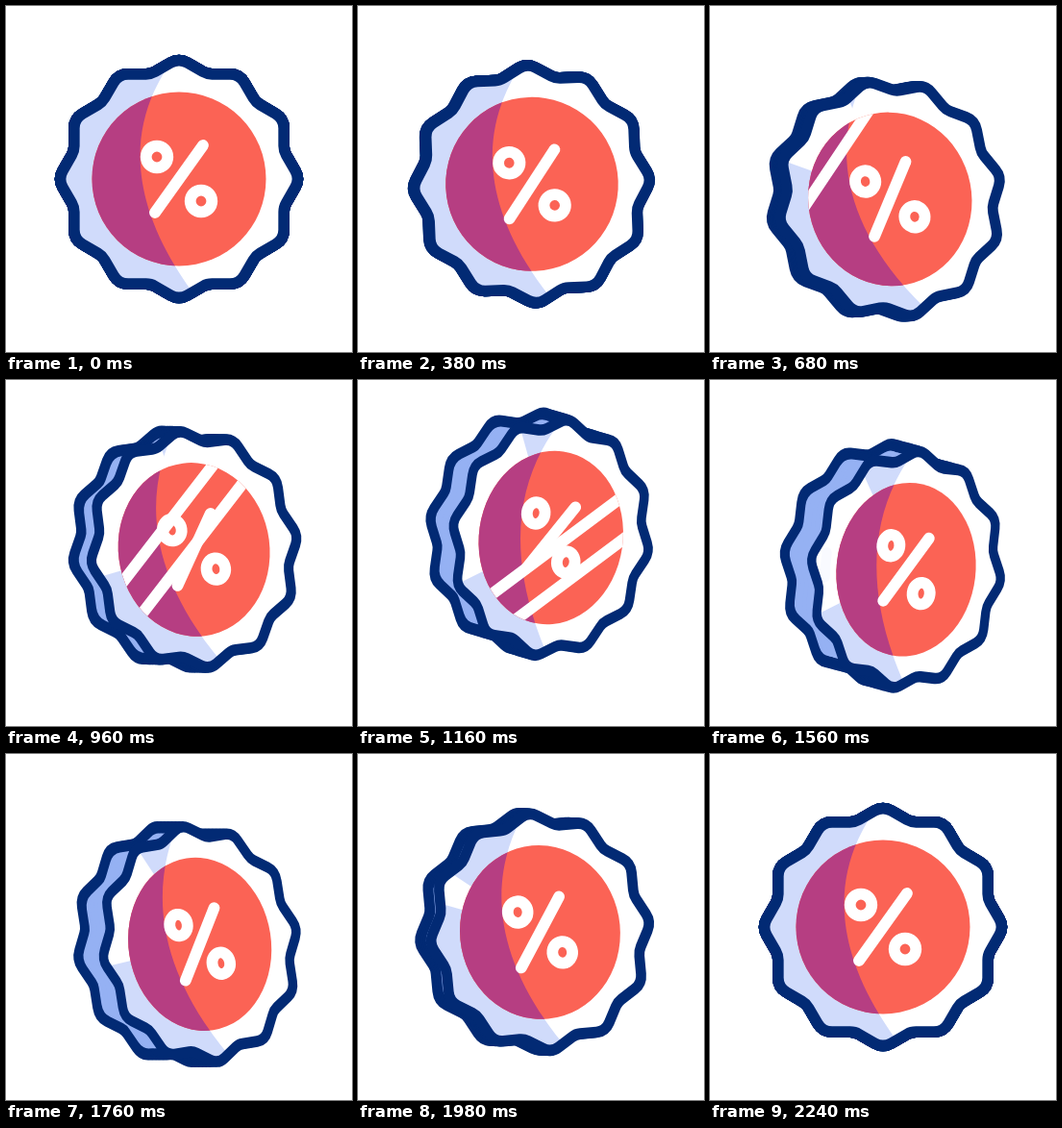
Animation of 360x360 px, one loop 2400 ms. Source, as an HTML page:

```html
<!DOCTYPE html>
<html lang="en">
<head>
<meta charset="utf-8">
<title>Discount badge</title>
<style>
  html, body { margin: 0; width: 100%; height: 100%; overflow: hidden; background: #fff; }
  svg { display: block; width: 100vw; height: 100vh; }
  .rim { fill: none; stroke: #022a74; stroke-width: 11.6; stroke-linejoin: round; vector-effect: non-scaling-stroke; }
  .side { fill: #95b1f3; }
  .shade { fill: #d0dbfb; }
  .white { fill: none; stroke: #fff; }
  .sign * { vector-effect: non-scaling-stroke; }
</style>
</head>
<body>
<svg viewBox="0 0 360 360">
  <defs>
    <path id="badge"/>
    <path id="shadow" d="M-10 -119C-54 -55 -54 25 15 119L-140 140V-140Z"/>
    <clipPath id="inBadge"><use href="#badge"/></clipPath>
    <clipPath id="inDisc"><circle r="90.5"/></clipPath>
  </defs>
  <g id="coin">
    <g id="rims"></g>
    <g id="sides"></g>
    <g id="face">
      <use href="#badge" fill="#fff"/>
      <g clip-path="url(#inBadge)">
        <use href="#shadow" class="shade"/>
        <path id="glare" class="white" stroke-width="38"/>
        <path id="patch" fill="none" stroke="#d0dbfb" stroke-width="13" stroke-linecap="round"/>
      </g>
      <circle r="90.5" fill="#fb6355"/>
      <g clip-path="url(#inDisc)">
        <use href="#shadow" fill="#b63e82"/>
        <path id="shine" class="white" stroke-width="12" d="M0 -150V150M-36 -150V150"/>
      </g>
      <g class="white sign" stroke-width="11.8" stroke-linecap="round">
        <circle cx="-23" cy="-23" r="11.3"/>
        <circle cx="23" cy="23" r="11.3"/>
        <path d="M25 -35L-25 35"/>
      </g>
      <use href="#badge" class="rim"/>
    </g>
  </g>
</svg>
<script>
const LOOP = 2400, LAYERS = 7;
const $ = id => document.getElementById(id);

// Eased 0 to 1 between two times
function ease(t, from, to) {
  const u = Math.min(1, Math.max(0, (t - from) / (to - from)));
  return (1 - Math.cos(Math.PI * u)) / 2;
}

function badgePath() {
  const pts = Array.from({ length: 24 }, (_, i) => {
    const a = i * Math.PI / 12, r = i % 2 ? 113 : 126;
    return [r * Math.sin(a), -r * Math.cos(a)];
  });
  const mix = (p, q, f) => p.map((c, i) => (c + (q[i] - c) * f).toFixed(2));
  return pts.map((p, i) => {
    const f = i % 2 ? .15 : .3;
    const from = mix(p, pts[(i + 23) % 24], f), to = mix(p, pts[(i + 1) % 24], f);
    return `${i ? 'L' : 'M'}${from}Q${mix(p, p, 0)} ${to}`;
  }).join('') + 'Z';
}

// Angles in degrees, from the left side upwards
function arc(r, low, high) {
  const at = deg => {
    const a = deg * Math.PI / 180;
    return `${-r * Math.cos(a)} ${-r * Math.sin(a)}`;
  };
  return `M${at(low)}A${r} ${r} 0 0 1 ${at(high)}`;
}

function copies(parent, cls) {
  return Array.from({ length: LAYERS }, () => {
    const use = document.createElementNS('http://www.w3.org/2000/svg', 'use');
    use.setAttribute('href', '#badge');
    use.setAttribute('class', cls);
    return parent.appendChild(use);
  });
}

$('badge').setAttribute('d', badgePath());
$('patch').setAttribute('d', arc(105, -9, 4));
const rims = copies($('rims'), 'rim'), sides = copies($('sides'), 'side');
const move = (el, value) => el.setAttribute('transform', value);

function draw(t) {
  const e = (from, to) => ease(t, from, to);

  // One turn aside and back, with two bobs and two rocks on the way
  const aside = e(220, 1460) - e(1640, 2240);
  const bob = 21 * e(220, 700) - 37 * e(700, 1130) + 36.5 * e(1150, 1660) - 20.5 * e(1640, 2160);
  const rock = -12.3 * e(220, 790) + 30.3 * e(810, 1380) - 27 * e(1380, 1780) + 9 * e(1780, 2240);
  const squash = 1 - .2 * aside, depth = 29 * aside;

  move($('coin'), `translate(${180 + 24 * aside} ${180 + bob}) rotate(${rock})`);
  move($('face'), `scale(${squash} 1)`);
  rims.forEach((rim, i) => {
    const back = depth * (1 - i / LAYERS);
    const place = `translate(${-back} ${-.15 * back})`;
    move(rim, `${place} scale(${squash} 1)`);
    move(sides[i], `${place} scale(${squash * .945} .945)`);
  });

  // Glare wipes the shadow off the ring, then lets it close again
  const low = 50 - 88 * e(360, 1360) + 63 * e(1360, 2120);
  const high = 50 + 28 * e(360, 660) - 32 * e(960, 1360) + 15 * e(1360, 1760) - 36 * e(1760, 2120);
  $('glare').setAttribute('d', high - low > .5 ? arc(106, low, high) : '');
  $('patch').setAttribute('opacity', e(1160, 1300) - e(1440, 1600));
  move($('shine'), `scale(${1 / squash} 1) rotate(45) translate(${-70 + (t - 680) * .242} 0)`);
}

const start = performance.now();
function tick() {
  draw((performance.now() - start) % LOOP);
  requestAnimationFrame(tick);
}
tick();
</script>
</body>
</html>
```
